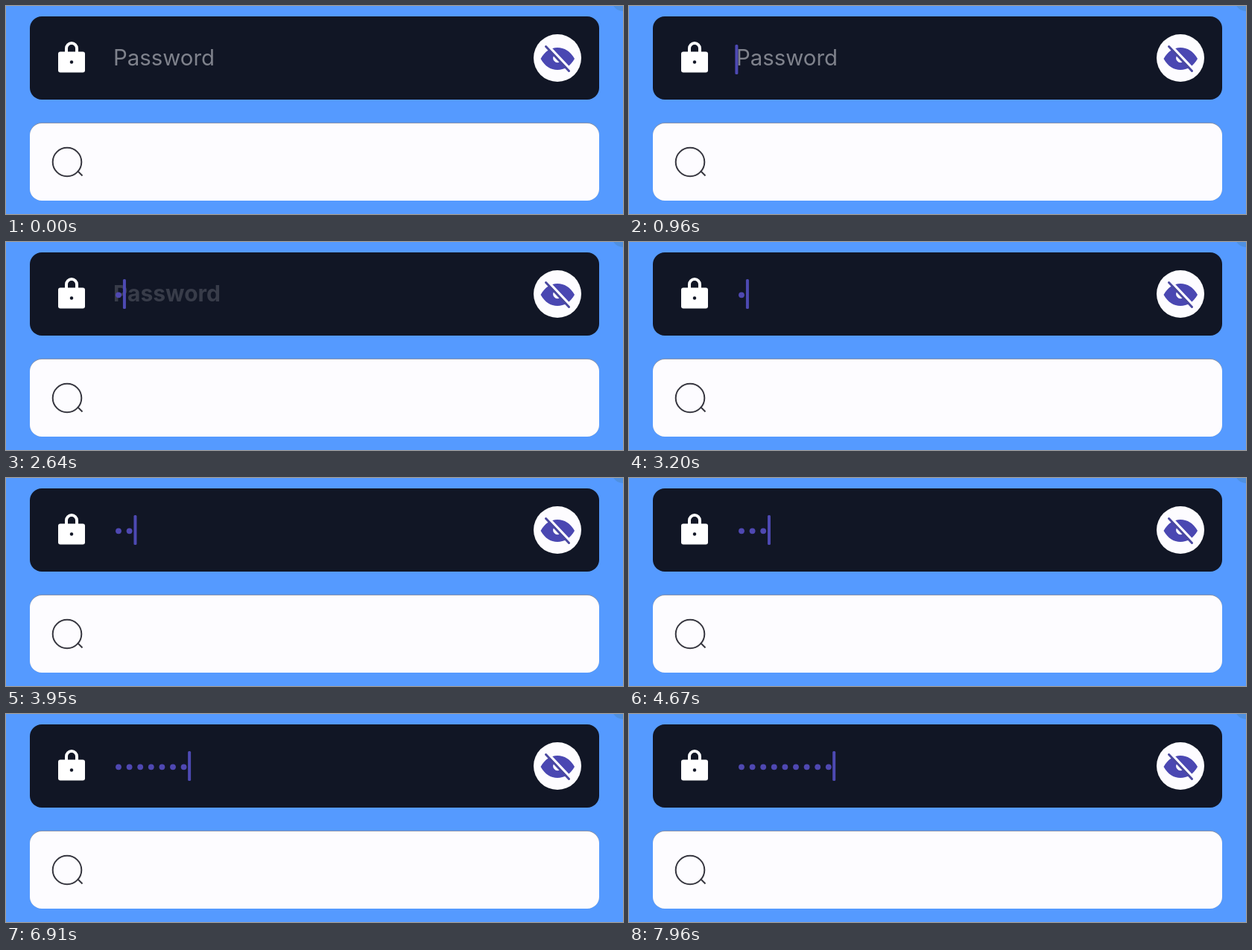
An HTML page for the animation above (8000 ms loop, 828 px wide and 280 px high).

```html
<!DOCTYPE html>
<html lang="en">
<head>
<meta charset="utf-8">
<title>Password field</title>
<style>
  html, body { margin: 0; width: 100%; height: 100%; overflow: hidden; background: #559aff; }
  svg { display: block; width: 828px; height: 280px; }
  text { font: 400 29.4px Inter, sans-serif; }
  .bold { font-weight: 700; font-size: 30px; }
</style>
</head>
<body>
<svg viewBox="0 0 828 280">
  <rect width="828" height="280" fill="#559aff"/>
  <circle cx="828" cy="-8" r="15" fill="#4f90e0"/>

  <rect x="32" y="14" width="764" height="112" rx="16" fill="#111625"/>
  <g fill="#fff">
    <path d="M81 63V57a7 7 0 0 1 14 0v6" fill="none" stroke="#fff" stroke-width="4"/>
    <rect x="70" y="61.500" width="36" height="28" rx="3"/>
    <circle cx="88" cy="75.500" r="2.200" fill="#111625"/>
  </g>

  <text id="hint" x="144" y="80" fill="#7f828c">Password</text>
  <g id="dots" fill="#4f48b2"></g>
  <rect id="caret" width="4" height="40" rx="1.500" fill="#4d49b2"/>

  <circle cx="740" cy="70" r="32" fill="#fdfcff"/>
  <path d="M717.500 71C723 61 731 56 740 56s17.500 5 23 15c-5.500 10-14 15-23 15s-17-5-22.500-15z" fill="#4a47b2"/>
  <path d="M735.500 66.500a6 6 0 0 0 7.500 9z" fill="#fdfcff"/>
  <g fill="none" stroke-linecap="round">
    <path d="M727 53l32 34" stroke="#fdfcff" stroke-width="3.500"/>
    <path d="M724.500 54.500l31 33" stroke="#4a48a0" stroke-width="3"/>
  </g>

  <rect x="32" y="157" width="764" height="105" rx="16" fill="#8490a8"/>
  <rect x="32" y="158" width="764" height="104" rx="16" fill="#fdfcff"/>
  <g fill="none" stroke="#36363f" stroke-width="2">
    <circle cx="82" cy="210" r="19.300"/>
    <path d="M96 222l6.500 6.500"/>
  </g>
</svg>
<script>
  const LOOP = 8000;
  const FOCUS = 860;
  const KEY_TIMES = [2540, 3390, 4230, 5490, 5640, 6150, 6650, 7100, 7550];
  const BLINK = { hold: 740, fade: 140, period: 1120 };
  const hint = document.getElementById("hint");
  const caret = document.getElementById("caret");
  const clamp = value => Math.min(1, Math.max(0, value));

  const dots = KEY_TIMES.map((_, i) => {
    const dot = document.createElementNS("http://www.w3.org/2000/svg", "circle");
    dot.setAttribute("cx", 151 + 14.6 * i);
    dot.setAttribute("cy", 71.3);
    dot.setAttribute("r", 3.9);
    document.getElementById("dots").append(dot);
    return dot;
  });

  // Solid after each input, then a soft dip to nothing and back.
  function caretOpacity(idle) {
    if (idle < 0) return 0;
    const phase = idle % BLINK.period;
    const fadeOut = 1 - (phase - BLINK.hold) / BLINK.fade;
    const fadeIn = 1 - (BLINK.period - phase) / BLINK.fade;
    return clamp(Math.max(fadeOut, fadeIn));
  }

  function draw() {
    const t = performance.now() % LOOP;
    const count = KEY_TIMES.filter(time => t >= time).length;
    dots.forEach((dot, i) => dot.style.display = i < count ? "" : "none");

    const lastInput = count ? KEY_TIMES[count - 1] : FOCUS;
    caret.style.opacity = caretOpacity(t - lastInput);
    caret.setAttribute("x", 142.4 + 14.53 * count);
    caret.setAttribute("y", count ? 50 : 52);

    // The placeholder takes the typed style while it fades away.
    hint.classList.toggle("bold", count > 0);
    hint.style.opacity = count ? 0.55 * clamp(1 - (t - KEY_TIMES[0]) / 280) : 1;
    requestAnimationFrame(draw);
  }
  draw();
</script>
</body>
</html>
```
